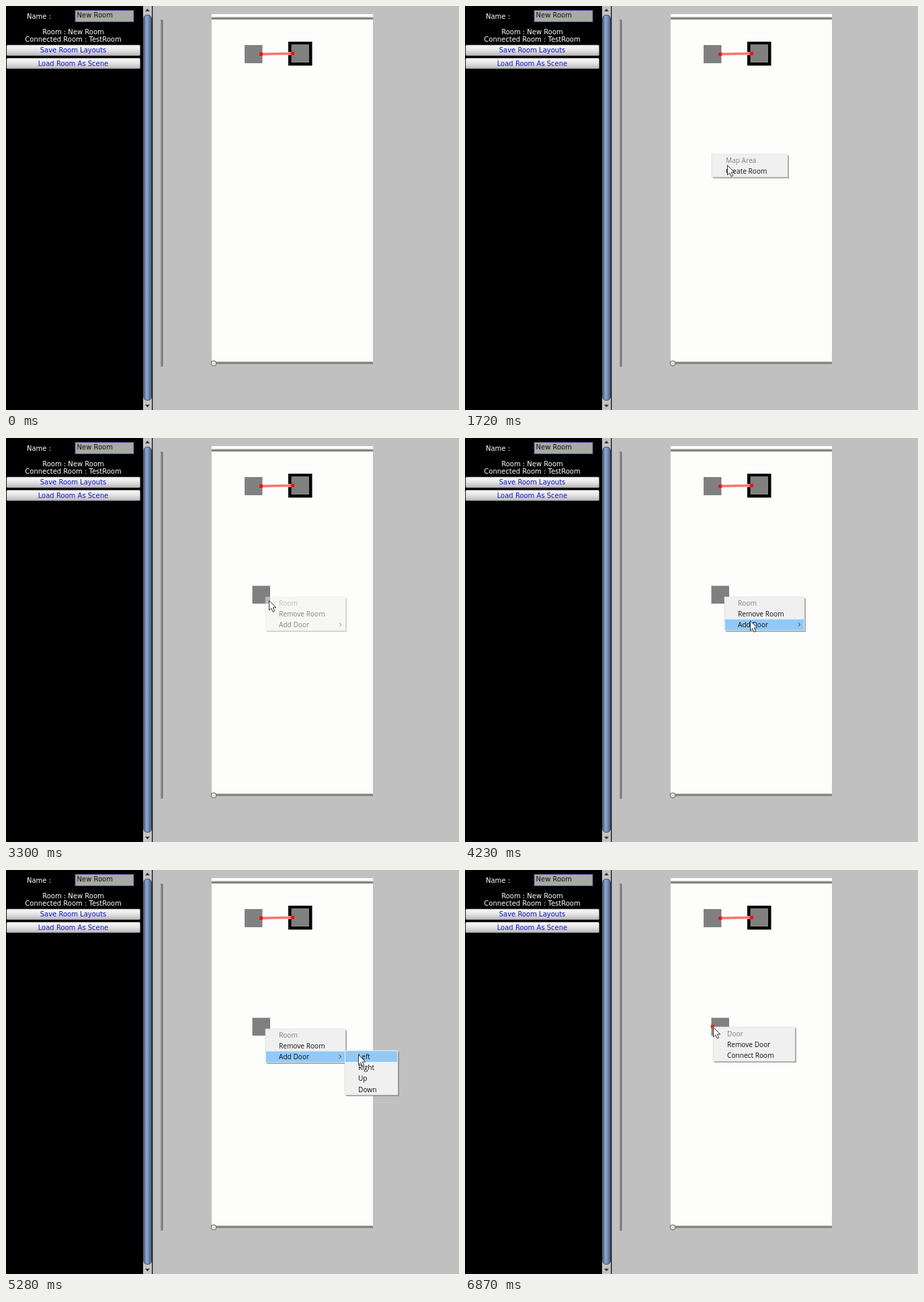
Recreate the animation shown at these times as an HTML page. Size 674 by 600 pixels, loop 7000 ms.

```html
<!DOCTYPE html>
<html lang="en">
<head>
<meta charset="utf-8">
<title>Room editor</title>
<style>
  html, body { margin: 0; width: 100%; height: 100%; overflow: hidden; background: #c0c0c0; }
  svg { display: block; width: 674px; height: 600px; }
  text { white-space: pre; }
  .ui { font: 10px "DejaVu Sans", sans-serif; fill: #fff; }
  .mid { text-anchor: middle; }
  .dark { fill: #101010; }
  .link { fill: #1010d8; }
  .menu text { font: 10.15px "Open Sans", "Noto Sans", sans-serif; fill: #101010; }
  .menu .off { fill: #808080; }
</style>
</head>
<body>
<svg viewBox="0 0 674 600" xmlns="http://www.w3.org/2000/svg">
  <defs>
    <linearGradient id="btn" x2="0" y2="1">
      <stop offset="0" stop-color="#fafafa"/>
      <stop offset=".45" stop-color="#e6e6e6"/>
      <stop offset="1" stop-color="#b8b8ba"/>
    </linearGradient>
    <linearGradient id="thumb">
      <stop offset="0" stop-color="#4a5a78"/>
      <stop offset=".35" stop-color="#8fa8d0"/>
      <stop offset=".65" stop-color="#6f8cba"/>
      <stop offset="1" stop-color="#465672"/>
    </linearGradient>
    <linearGradient id="railV">
      <stop offset="0" stop-color="#b4b4b4"/>
      <stop offset=".5" stop-color="#808080"/>
      <stop offset="1" stop-color="#686868"/>
    </linearGradient>
    <linearGradient id="railH" x2="0" y2="1">
      <stop offset="0" stop-color="#c0c0bc"/>
      <stop offset=".5" stop-color="#74746c"/>
      <stop offset="1" stop-color="#a0a09a"/>
    </linearGradient>
  </defs>

  <rect width="674" height="600" fill="#c0c0c0"/>

  <!-- side panel -->
  <rect width="204" height="600"/>
  <text class="ui" x="31" y="19">Name :</text>
  <rect x="103" y="6.5" width="87" height="17" fill="#a9a9a9" stroke="#4458a0"/>
  <text class="ui dark" x="105.5" y="17">New Room</text>
  <text class="ui mid" x="100" y="42">Room : New Room</text>
  <text class="ui mid" x="100" y="53">Connected Room : TestRoom</text>
  <g fill="url(#btn)" stroke="#8c8c8c" stroke-width=".6">
    <rect x="1" y="58" width="198.5" height="15.7" rx="1.5"/>
    <rect x="1" y="77.5" width="198.5" height="15.5" rx="1.5"/>
  </g>
  <text class="ui mid link" x="100" y="69">Save Room Layouts</text>
  <text class="ui mid link" x="100" y="88.6">Load Room As Scene</text>

  <!-- scrollbar -->
  <rect x="204" width="13" height="600" fill="#c4c4c4"/>
  <rect x="217" width="1.3" height="600" fill="#101010"/>
  <rect x="204.8" y="13.5" width="11.6" height="572" rx="5" fill="url(#thumb)" stroke="#3c4454"/>
  <path d="M207 8h7l-3.5-4zM207 592h7l-3.5 4z" fill="#3c3c3c"/>

  <!-- map -->
  <rect x="306" y="12" width="240" height="518" fill="#fdfdfc"/>
  <rect x="229.5" y="20" width="4" height="516" rx="2" fill="url(#railV)"/>
  <rect x="306" y="16.3" width="240" height="4" rx="1" fill="url(#railH)"/>
  <rect x="306" y="528" width="240" height="4" rx="1" fill="url(#railH)"/>
  <circle cx="309" cy="530.7" r="3.9" fill="#e2e2e2" stroke="#606060"/>

  <rect x="355" y="58" width="26.5" height="27" fill="#808080"/>
  <rect x="420" y="53" width="35.5" height="35.5"/>
  <rect x="424.5" y="57" width="26.5" height="27" fill="#808080"/>
  <path d="M379 71.5L427 70.5" stroke="#ffb4a8" stroke-width="4.5"/>
  <path d="M379 71.5L427 70.5" stroke="#ff6058" stroke-width="2.2"/>
  <path d="M377 69h5v5h-5zM424 68h5v5h-5z" fill="#f8100c"/>

  <g id="live"></g>
</svg>
<script>
const LOOP = 7000, STEPS = 53, ROW = 16.2;
const live = document.getElementById('live');

// Cursor stops: step, x, y
const path = [
  [3, 598, 545], [8, 367, 220], [12, 367, 220], [13, 390, 236],
  [16, 399, 248], [21, 399, 248], [24, 386, 236], [25, 391, 241],
  [31, 424, 271], [35, 424, 271], [40, 524, 274], [43, 528, 277],
  [45, 528, 277], [50, 369, 233], [53, 369, 233]
];

// "in" and "out" are the steps where the menu opens and where it is gone
const menus = [
  { x: 367, y: 220, w: 113, h: 34, pad: 21, in: 12, out: 20, head: 1, pick: 1,
    items: ['Map Area', 'Create Room'] },
  { x: 386, y: 236, w: 119, h: 50, pad: 20, in: 25, out: 45, head: 1, arrow: 2,
    items: ['Room', 'Remove Room', 'Add Door'] },
  { x: 504, y: 268, w: 79, h: 66, pad: 20, in: 34, out: 45, head: 0, pick: 0,
    items: ['Left', 'Right', 'Up', 'Down'] },
  { x: 369, y: 233, w: 122, h: 51, pad: 21, in: 51, out: 53, head: 1, base: 14,
    items: ['Door', 'Remove Door', 'Connect Room'] }
];

const rect = (x, y, w, h, fill, more = '') =>
  `<rect x="${x}" y="${y}" width="${w}" height="${h}" fill="${fill}" ${more}/>`;

const startOf = i => Math.round(i * LOOP / STEPS / 10) * 10;

function stepAt(t) {
  let i = Math.min(STEPS - 1, Math.ceil(t * STEPS / LOOP));
  while (startOf(i) > t) i--;
  return i;
}

function cursorAt(i) {
  if (i < path[0][0]) return null;
  const k = path.findIndex(p => p[0] > i);
  const [a, x, y] = path[k - 1], [b, u, v] = path[k];
  const p = (i - a) / (b - a), e = p * p * (3 - 2 * p);
  return { x: x + (u - x) * e, y: y + (v - y) * e };
}

function row(m, n, lit) {
  const y = m.y + 1 + n * ROW;
  const off = m.head && n === 0 ? ' class="off"' : '';
  let s = lit ? rect(m.x + 1, y, m.w - 2, 16, '#91c9f7') : '';
  s += `<text x="${m.x + m.pad}" y="${m.y + (m.base || 13) + n * ROW}"${off}>${m.items[n]}</text>`;
  if (m.arrow === n) {
    s += `<path d="M${m.x + m.w - 9} ${y + 5}l2.5 2.7l-2.5 2.7" fill="none" stroke="#303030"/>`;
  }
  return s;
}

function menu(m, i, c) {
  if (i < m.in) return '';
  if (i >= m.out) {
    // the chosen row lingers and fades
    const a = [.62, .22][i - m.out];
    return a && m.pick !== undefined ? `<g class="menu" opacity="${a}">${row(m, m.pick, true)}</g>` : '';
  }
  const inside = c.x >= m.x && c.x < m.x + m.w;
  let lit = inside ? Math.floor((c.y - m.y - 1) / ROW) : -1;
  if (lit < m.head) lit = -1;
  if (m.arrow && i >= 34) lit = m.arrow;
  const body =
    rect(m.x + 2, m.y + 2, m.w, m.h, '#707070', 'opacity=".6"') +
    rect(m.x, m.y, m.w, m.h, '#f0f0f0', 'stroke="#d8d8d8" stroke-width=".6"') +
    m.items.map((_, n) => row(m, n, n === lit)).join('');
  return `<g class="menu" opacity="${i === m.in ? .5 : 1}">${body}</g>`;
}

const arrow = c =>
  `<path transform="translate(${c.x} ${c.y})" d="M.5 .5V15L3.8 11.9L6.1 17.2L8.6 16.1L6.3 10.9H10.8Z"
    fill="#fff" stroke="#202020" stroke-width=".9"/>`;

function draw(i) {
  const c = cursorAt(i);
  let s = '';
  if (i >= 20) s += rect(366.5, 219.5, 26.5, 26.5, '#808080');
  if (i >= 45) s += rect(366, 230, 5, 5, '#f8100c');
  s += menus.map(m => menu(m, i, c)).join('');
  if (c) s += arrow(c);
  live.innerHTML = s;
}

let shown = -1;
const began = performance.now();
function tick() {
  const i = stepAt((performance.now() - began) % LOOP);
  if (i !== shown) draw(shown = i);
  requestAnimationFrame(tick);
}
tick();
</script>
</body>
</html>
```
